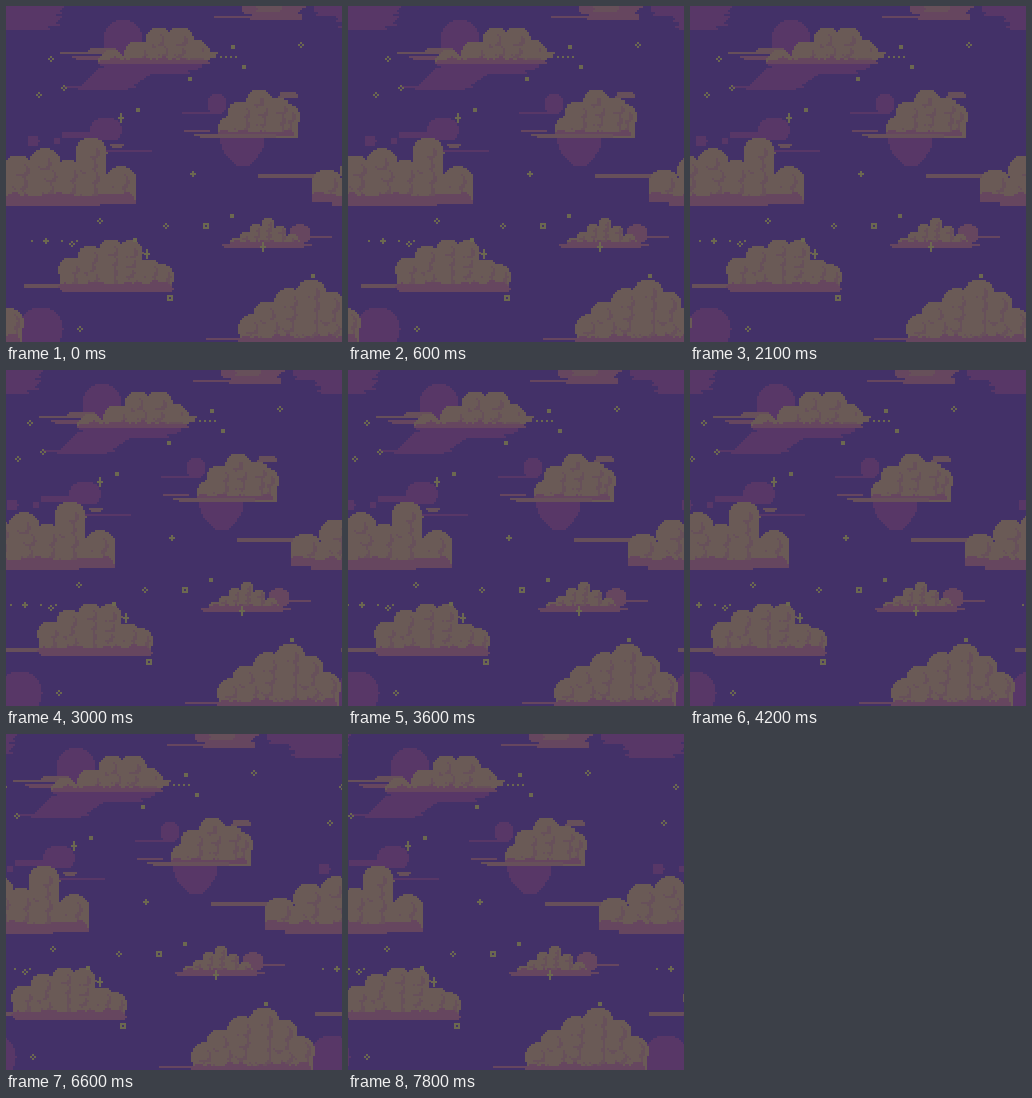
These frames come from a looping animation (336 px wide and 336 px high, 8 s). An HTML page with a canvas:

```html
<!DOCTYPE html>
<html lang="en">
<head>
<meta charset="utf-8">
<title>Night clouds</title>
<style>
html, body { margin: 0; width: 100%; height: 100%; overflow: hidden; background: #433168; }
canvas { display: block; }
</style>
</head>
<body>
<canvas id="sky" width="400" height="336"></canvas>
<script>
const canvas = document.getElementById('sky');
const ctx = canvas.getContext('2d');
const BACK = '#583767', BASE = '#66465f', MID = '#67505a', LIGHT = '#6a5a56', STAR = '#6c6850';
const PERIOD = 338, CELL = 2;
let shift = 0, seed = 1;

const rnd = () => (seed = seed * 16807 % 2147483647) / 2147483647;
const snap = v => CELL * Math.round(v / CELL);

function row(x0, x1, y, color) {
  const a = snap(x0);
  ctx.fillStyle = color;
  ctx.fillRect(a + shift, snap(y), snap(x1) - a, CELL);
}

function disc(x, y, rx, color, ry = rx, floor = 336) {
  for (let yy = snap(y - ry); yy < Math.min(y + ry, floor); yy += CELL) {
    const k = 1 - ((yy + 1 - y) / ry) ** 2;
    if (k > 0) row(x - rx * Math.sqrt(k), x + rx * Math.sqrt(k), yy, color);
  }
}

// Flat streaks; both ends draw in row by row by up to `taper`
function wisp(x0, x1, y, rows, color, taper = 8) {
  for (let i = 0; i < rows; i++) {
    row(x0 + i * taper * rnd(), x1 - i * taper * rnd(), y + i * CELL, color);
  }
}

// Puffs of radius r hang below the crown points [x, top] and reach down to a flat floor
function cloud(crown, r, floor) {
  for (const [x, top] of crown) {
    disc(x, top + r, r, LIGHT, r, floor);
    for (let y = top + r; y < floor; y += CELL) row(x - r * 0.9, x + r * 0.9, y, LIGHT);
  }
  for (const [x, top] of crown) {
    for (let y = top + r; y < floor; y += r * 0.8) {
      const size = r * (0.4 + 0.25 * rnd()), px = x + (rnd() - 0.4) * (r - size);
      disc(px, y, size, MID, size, floor);
      disc(px - 2, y - 2, size - 1, LIGHT, size - 1, floor);
    }
  }
  const xs = crown.map(p => p[0]), end = Math.max(...xs) + r * 0.9;
  for (let x = Math.min(...xs) - r * 0.5; x < end - r * 0.3; x += r * 0.7) {
    disc(x, floor, r * 0.5, BASE, r * (0.3 + 0.3 * rnd()), floor);
  }
}

function dot(x, y, size = CELL) {
  ctx.fillStyle = STAR;
  ctx.fillRect(x + shift - size / 2, y - size / 2, size, size);
}

// Cells around a point; `reach` 1 gives a diamond, 2 a box
function ring(x, y, reach = 1) {
  for (let i = -1; i <= 1; i++) for (let j = -1; j <= 1; j++) {
    const d = Math.abs(i) + Math.abs(j);
    if (d && d <= reach) dot(x + i * CELL, y + j * CELL);
  }
}

function glint(x, y) {
  for (let i = -2; i <= 2; i++) dot(x, y + i * CELL);
  ring(x, y);
}

function topEdge() {
  wisp(-30, 57, 0, 5, BACK, 2);
  wisp(-8, 56, 10, 7, BACK, 3);
  wisp(208, 250, 9, 1, BASE);
  wisp(236, 300, 0, 7, BASE, 4);
  wisp(250, 276, 0, 3, MID, 2);
}

function longCloud() {
  disc(117, 34, 20, BACK);
  for (let i = 0; i < 11; i++) row(92 - i * 2, 152 - i * 3, 62 + i * CELL, BACK);
  wisp(57, 130, 80, 1, BACK);
  wisp(54, 110, 45, 1, MID);
  wisp(66, 200, 50, 2, BASE);
  wisp(84, 110, 41, 3, MID, -3);
  cloud([[106, 44], [132, 35], [190, 34], [153, 21], [174, 21]], 14, 58);
  wisp(190, 211, 46, 3, LIGHT, 1);
  wisp(94, 196, 57, 5, BACK, 7);
}

function rightCloud() {
  disc(211, 98, 10, BACK);
  wisp(175, 215, 106, 1, BACK);
  for (let i = 0; i < 15; i++) row(214 + i * i / 13, 259 - i * i / 13, 130 + i * CELL, BACK);
  wisp(274, 290, 86, 3, MID, -2);
  cloud([[225, 110], [234, 95], [281, 98], [272, 91], [253, 83]], 13, 130);
  wisp(178, 204, 123, 1, BASE);
  wisp(188, 270, 127, 2, MID);
}

function bigCloud() {
  disc(100, 124, 16, BACK, 13, 134);
  wisp(55, 112, 125, 3, BACK, 6);
  wisp(96, 146, 143, 1, BACK);
  wisp(104, 118, 137, 2, MID, 2);
  disc(27, 135, 6, BACK);
  disc(51, 135, 3, BACK);
  wisp(-86, -24, 168, 2, MID);
  cloud([[-17, 163], [12, 149], [39, 142], [62, 154], [115, 160], [85, 131]], 16, 195);
  wisp(-30, 130, 194, 3, BASE, 18);
}

function smallCloud() {
  disc(294, 228, 11, BASE, 10);
  wisp(294, 326, 229, 1, BASE);
  cloud([[230, 232], [240, 225], [286, 228], [274, 219], [250, 217], [262, 211]], 7, 238);
  wisp(215, 306, 237, 2, BASE, 12);
}

function lowCloud() {
  wisp(17, 70, 277, 2, MID);
  cloud([[65, 251], [155, 258], [143, 253], [84, 239], [124, 234], [105, 233]], 13, 282);
  wisp(53, 168, 281, 2, BASE, 12);
}

function cornerCloud() {
  disc(373, 323, 22, BACK);
  wisp(200, 246, 332, 1, BASE);
  cloud([[247, 308], [262, 295], [341, 302], [324, 285], [283, 282], [305, 273]], 15, 336);
}

function stars() {
  for (const p of [[45, 53], [33, 89], [58, 82], [295, 39], [94, 215], [160, 220],
    [74, 323], [66, 238]]) ring(...p);
  for (const p of [[187, 168], [40, 235]]) { ring(...p); dot(...p); }
  for (const p of [[200, 220], [164, 292]]) ring(...p, 2);
  for (const p of [[115, 112], [257, 241], [141, 248]]) glint(...p);
  for (let i = 0; i < 4; i++) {
    dot(215 + i * 5, 51);
    dot(26 + i * 15, 235);
  }
  for (const p of [[227, 41], [238, 61], [184, 73], [132, 104], [226, 210], [129, 234],
    [307, 270]]) dot(...p, 4);
}

for (const part of [topEdge, longCloud, rightCloud, bigCloud, smallCloud, lowCloud, cornerCloud, stars]) {
  for (shift of [-PERIOD, 0, PERIOD]) {
    seed = 77;
    part();
  }
}

// Drift: [step, distance], one step every 300 ms
const path = [[0, 0], [4, 10], [10, 21], [14, 31], [26, 55]];

function drift(step) {
  const i = path.findIndex(p => p[0] > step);
  const [a, b] = i < 0 ? path.slice(-2) : [path[i - 1], path[i]];
  return Math.round(a[1] + (b[1] - a[1]) * (step - a[0]) / (b[0] - a[0]));
}

function tick() {
  const step = Math.floor(performance.now() % 8000 / 300);
  canvas.style.transform = `translateX(${-drift(step)}px)`;
  requestAnimationFrame(tick);
}
tick();
</script>
</body>
</html>
```
